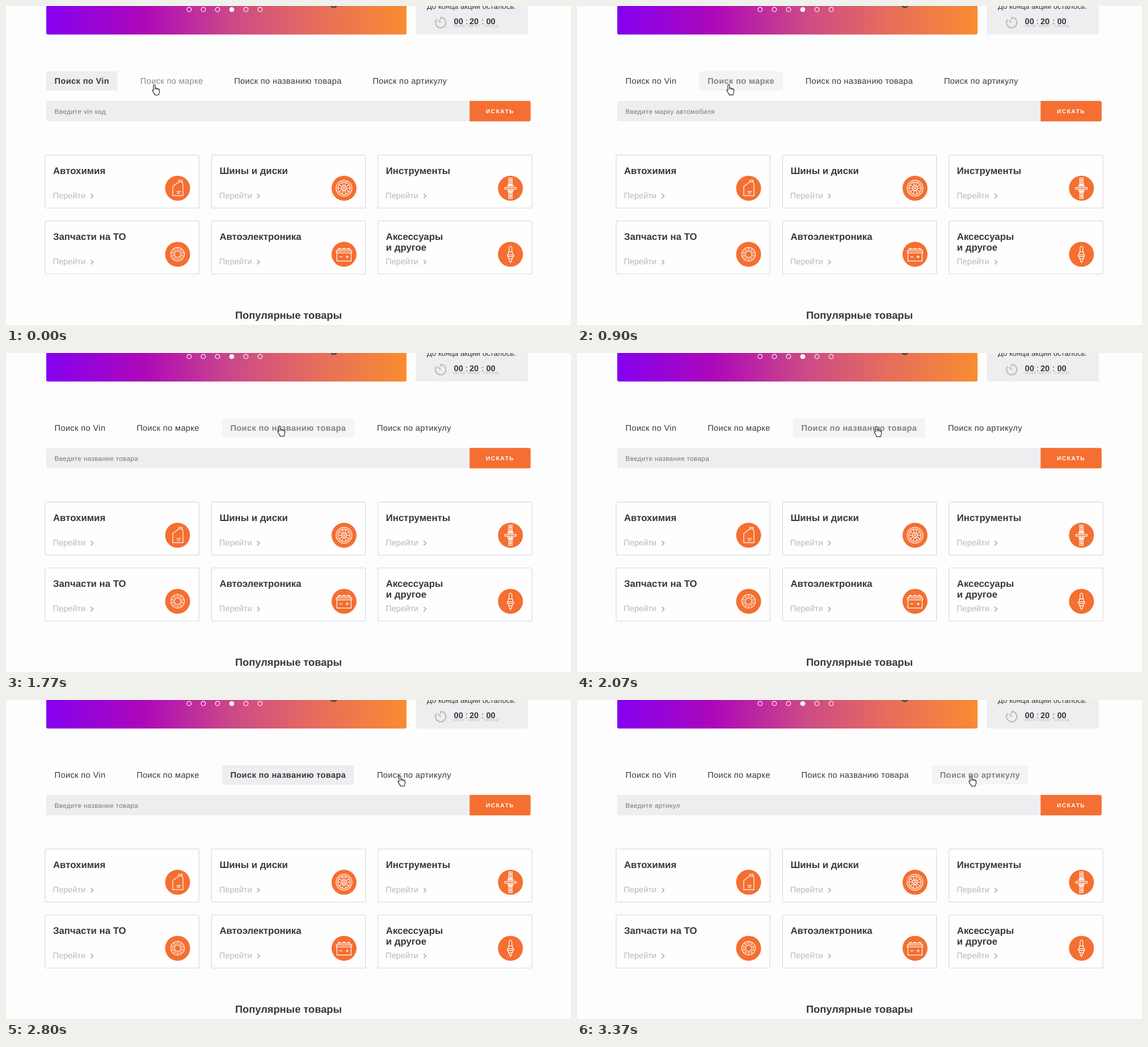
Animation, 996 px wide and 562 px high, one loop 3.41 s. Source, as an HTML page with a canvas:

```html
<!DOCTYPE html>
<html lang="ru">
<head>
<meta charset="utf-8">
<title>Поиск автотоваров</title>
<style>
html, body { margin: 0; width: 100%; height: 100%; overflow: hidden; background: #fdfdfd; }
canvas { display: block; }
</style>
</head>
<body>
<canvas id="stage" width="996" height="562"></canvas>
<script>
const ctx = document.getElementById('stage').getContext('2d');
const LOOP = 3410;
const ZOOM = 0.73; // the page is laid out in CSS pixels at 73% zoom
const PANEL = '#eeeef1', INK = '#38383c', MUTED = '#b9b9bd', ORANGE = '#f46f31';
const LEFT = 71;

ctx.textRendering = 'geometricPrecision';

function setFont(size, { bold = false, spacing = 0 } = {}) {
  ctx.font = `${bold ? 'bold ' : ''}${size * ZOOM}px "Liberation Sans", Arial, sans-serif`;
  ctx.letterSpacing = `${spacing * ZOOM}px`;
}

function text(str, x, y, size, color, options = {}) {
  setFont(size, options);
  ctx.textAlign = options.align || 'left';
  ctx.fillStyle = color;
  ctx.fillText(str, x, y);
}

function box(x, y, w, h, radius, fill) {
  ctx.beginPath();
  ctx.roundRect(x, y, w, h, radius);
  ctx.fillStyle = fill;
  ctx.fill();
}

function strokePath(d, color, width) {
  ctx.strokeStyle = color;
  ctx.lineWidth = width;
  ctx.stroke(new Path2D(d));
}

function ring(x, y, r, color, width) {
  ctx.beginPath();
  ctx.arc(x, y, r, 0, Math.PI * 2);
  ctx.strokeStyle = color;
  ctx.lineWidth = width;
  ctx.stroke();
}

function disc(x, y, r, color) {
  ctx.beginPath();
  ctx.arc(x, y, r, 0, Math.PI * 2);
  ctx.fillStyle = color;
  ctx.fill();
}

function around(count, radius, draw) {
  for (let i = 0; i < count; i++) {
    const a = i / count * Math.PI * 2 - Math.PI / 2;
    draw(Math.cos(a) * radius, Math.sin(a) * radius, a);
  }
}

const line = d => strokePath(d, '#fff', 1.2);

const icons = {
  canister() {
    line('M2-11V-14H8V-11M2-11H8L9.5-7V13H-8.5V-3L2-11M-2 6H6M-1 9H4');
  },
  wheel() {
    ring(0, 0, 14, '#fff', 1.2);
    ring(0, 0, 11, '#fff', 1.1);
    ring(0, 0, 3.8, '#fff', 1.2);
    disc(0, 0, 1.5, '#fff');
    around(5, 7.5, (x, y, a) => {
      ctx.save();
      ctx.rotate(a);
      line('M3.5-1.3L10-2.8M3.5 1.3L10 2.8');
      ctx.restore();
    });
  },
  tool() {
    line('M-10-1.5H10V1.5H-10Z');
    for (const flip of [1, -1]) {
      ctx.save();
      ctx.scale(1, flip);
      line('M-3-18H3V-10H-3ZM-2-10L-5-4H5L2-10M-2.5-4V-1.5M2.5-4V-1.5');
      ctx.fillStyle = '#fff';
      ctx.fillRect(-1.5, -16, 3, 4);
      ctx.fillRect(-3, -8, 6, 3);
      ctx.restore();
    }
  },
  bearing() {
    ring(0, 0, 12, '#fff', 1.2);
    ring(0, 0, 5.6, '#fff', 1.2);
    around(10, 8.8, (x, y) => ring(x, y, 1.4, '#fff', 0.9));
  },
  battery() {
    line('M-12.5-2.5H12.5V12H-12.5ZM-13.5-6H13.5V-2.5H-13.5ZM-11-6V-9H11V-6M-8 4.5H-3M3 4.5H8M5.5 2V7');
    line('M-10-10.5H-6M-2-10.5H2M6-10.5H10');
  },
  plug() {
    line('M-2.5-4V-12Q0-17 2.5-12V-4ZM-3.5-4H3.5L4 1H-4ZM-5.5 1H5.5V4H-5.5ZM-3.5 4V8H3.5V4M-2.5 8L-1.5 13H1.5L2.5 8M0 13V15.5');
  }
};

const cards = [
  [['Автохимия'], 'canister'],
  [['Шины и диски'], 'wheel'],
  [['Инструменты'], 'tool'],
  [['Запчасти на ТО'], 'bearing'],
  [['Автоэлектроника'], 'battery'],
  [['Аксессуары', 'и другое'], 'plug']
];

function drawCard([title, icon], index) {
  ctx.save();
  ctx.translate(69 + index % 3 * 293.4, 262.5 + Math.floor(index / 3) * 116.3);
  ctx.beginPath();
  ctx.roundRect(0, 0, 271.2, 93.5, 2);
  ctx.fillStyle = '#fefefe';
  ctx.fill();
  ctx.strokeStyle = '#d6d6e1';
  ctx.lineWidth = 1.1;
  ctx.stroke();
  title.forEach((row, i) => text(row, 14, 33.3 + i * 19.2, 23, INK, { bold: true }));
  text('Перейти', 13.4, 76.6, 20, MUTED);
  strokePath('M80.5 68.5L84.5 72.5L80.5 76.5', '#a2a2a7', 1.4);
  ctx.translate(233.5, 58.6);
  disc(0, 0, 22, ORANGE);
  icons[icon]();
  ctx.restore();
}

function drawBanner() {
  const fade = ctx.createLinearGradient(LEFT, 0, 706, 0);
  fade.addColorStop(0, '#8400f0');
  fade.addColorStop(0.27, '#ad08b9');
  fade.addColorStop(0.52, '#cc4a87');
  fade.addColorStop(0.76, '#e76e5b');
  fade.addColorStop(1, '#f98c30');
  box(LEFT, -10, 635, 60.3, 3, fade);
  for (let i = 0; i < 6; i++) {
    const x = 322.8 + i * 25.05;
    if (i === 3) disc(x, 6.2, 4.3, '#fff');
    else ring(x, 6.2, 3.8, '#fff', 1.2);
  }
  disc(578, -3.5, 7, '#4b3d40');
  disc(578, -3.5, 4.6, '#a98a7c');
}

function drawTimer() {
  box(722.5, -10, 197.3, 60.3, 3, PANEL);
  text('До конца акции осталось:', 742, 4.6, 18, INK);
  ctx.beginPath();
  ctx.arc(766.3, 29.3, 9.2, -Math.PI / 2, Math.PI * 1.22);
  ctx.strokeStyle = MUTED;
  ctx.lineWidth = 2;
  ctx.stroke();
  strokePath('M766.3 20V24M766.3 29.3L761.5 24.5', MUTED, 2);
  [['00', 789.6, 'часов', 787], ['20', 816.9, 'минут', 814], ['00', 846.4, 'секунд', 842]]
    .forEach(([value, x, unit, unitX]) => {
      text(value, x, 31.6, 20, INK, { bold: true });
      text(unit, unitX, 37.4, 10, MUTED, { spacing: 0.8 });
    });
  text(':', 810, 31.6, 20, INK);
  text(':', 838, 31.6, 20, INK);
}

const clamp = v => Math.max(0, Math.min(1, v));
const smooth = v => v * v * (3 - 2 * v);

// hover: [enter, leave] times
const tabs = [
  { label: 'Поиск по Vin', hint: 'Введите vin код', from: 0, hover: [] },
  { label: 'Поиск по марке', hint: 'Введите марку автомобиля', from: 800, hover: [[-500, 1020]] },
  { label: 'Поиск по названию товара', hint: 'Введите название товара', from: 1600, hover: [[1110, 2110]] },
  { label: 'Поиск по артикулу', hint: 'Введите артикул', from: 3100, hover: [[2150, 2640], [3080, 4000]] }
];

function hoverAmount(tab, t) {
  return Math.max(0, ...tab.hover.map(([enter, leave]) =>
    Math.min(clamp((t - enter) / 120), 1 - clamp((t - leave) / 120))));
}

function drawSearch(t) {
  const active = tabs.findLast(tab => t >= tab.from);
  const pad = 20 * ZOOM, gap = 35 * ZOOM;
  let x = LEFT;
  for (const tab of tabs) {
    const style = { bold: tab === active, spacing: 0.5 };
    setFont(20, style);
    const width = ctx.measureText(tab.label).width + pad * 2;
    ctx.globalAlpha = 1 - 0.4 * hoverAmount(tab, t);
    if (tab === active) box(x, 115, width, 34, 3, PANEL);
    text(tab.label, x + pad, 137, 20, INK, style);
    ctx.globalAlpha = 1;
    x += width + gap;
  }
  box(LEFT, 167.3, 750, 36, 3, PANEL);
  text(active.hint, LEFT + pad, 189.5, 16, '#77777b', { spacing: 0.5 });
  box(817.3, 167.3, 107.5, 36, [0, 3, 3, 0], ORANGE);
  text('ИСКАТЬ', 846, 189.4, 14, '#fff', { bold: true, spacing: 2 });
}

// [time, x, y]
const route = [
  [0, 264, 147], [850, 264, 147], [1300, 433, 141], [1540, 485, 137],
  [1950, 485, 137], [2330, 673, 140], [2460, 697, 142], [LOOP, 697, 142]
];

function cursorAt(t) {
  const next = Math.max(1, route.findIndex(stop => stop[0] > t));
  const [t0, x0, y0] = route[next - 1];
  const [t1, x1, y1] = route[next];
  const k = smooth((t - t0) / (t1 - t0));
  return [x0 + (x1 - x0) * k, y0 + (y1 - y0) * k];
}

const hand = 'M-4-7a1.5 1.5 0 0 1 3 0v5q2.6-1 3 .6q2.2-.7 2.6 .8q2-.3 2 1.4v3q0 2.5-1.5 4.5v1.5h-7v-1.5q-2.5-3-4-6q-.5-1.6 1-1.6q.7 0 .9 1z';

function drawCursor(t) {
  ctx.save();
  ctx.translate(...cursorAt(t));
  ctx.fillStyle = '#fff';
  ctx.fill(new Path2D(hand));
  strokePath(hand, '#1c1c20', 1.1);
  strokePath('M-1-2V1M2-1.4V1.2M4.6-.6V1.6', '#1c1c20', 0.8);
  ctx.restore();
}

function draw(now) {
  const t = now % LOOP;
  ctx.fillStyle = '#fdfdfd';
  ctx.fillRect(0, 0, 996, 562);
  drawBanner();
  drawTimer();
  drawSearch(t);
  cards.forEach(drawCard);
  text('Популярные товары', 498, 551.3, 25, INK, { bold: true, align: 'center' });
  drawCursor(t);
  requestAnimationFrame(draw);
}

const start = performance.now();
(function tick() {
  draw(Math.max(0, performance.now() - start));
})();
</script>
</body>
</html>
```
